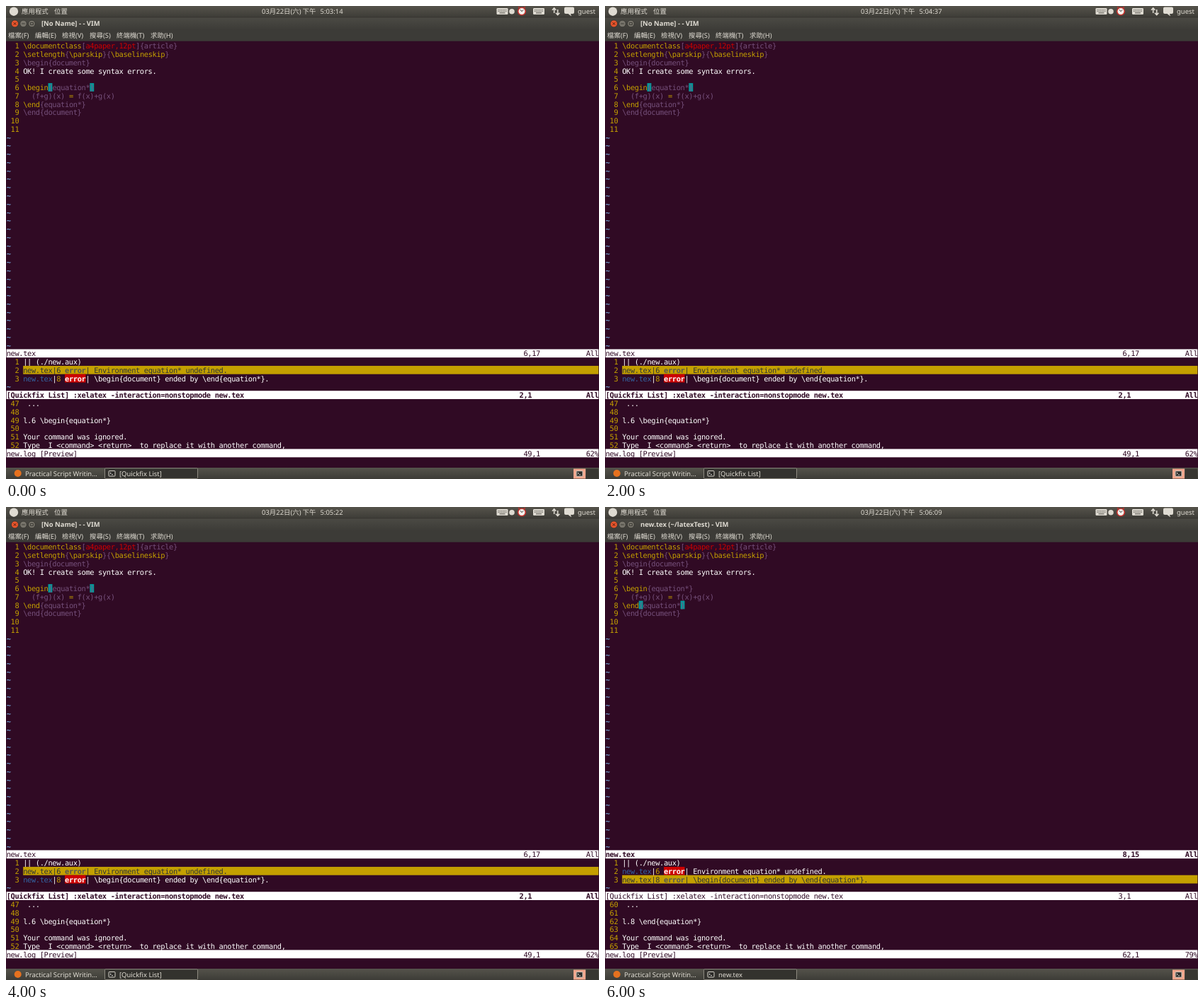
Recreate the animation shown at these times as an HTML page. Size 837 by 669 pixels, loop 7000 ms.

```html
<!DOCTYPE html>
<html lang="zh-Hant">
<head>
<meta charset="utf-8">
<title>Quickfix demo</title>
<style>
html, body { margin: 0; width: 100%; height: 100%; overflow: hidden; background: #300a24; }
svg { display: block; width: 100vw; height: 100vh; }
text { white-space: pre; text-rendering: geometricPrecision; }
.mono { font: 10.4px "DejaVu Sans Mono", monospace; letter-spacing: -.376px; }
.ui { font: 9.45px "Noto Sans", "Noto Sans CJK TC", "Noto Sans CJK", sans-serif; fill: #dfdbd2; }
.b { font-weight: bold; }
</style>
</head>
<body>
<svg viewBox="0 0 837 669">
  <defs>
    <linearGradient id="bar" x2="0" y2="1">
      <stop offset="0" stop-color="#55534b"/><stop offset="1" stop-color="#3d3c37"/>
    </linearGradient>
    <linearGradient id="head" x2="0" y2="1">
      <stop offset="0" stop-color="#4b4a44"/><stop offset="1" stop-color="#3c3b37"/>
    </linearGradient>
    <g id="keys">
      <rect width="16" height="9" rx="1.2" fill="#dfdbd2"/>
      <path d="M2 2.5H14M2 4.5H14" stroke="#4a4842" stroke-width="1" stroke-dasharray="1.2 1"/>
      <path d="M4 6.8H12" stroke="#4a4842" stroke-width="1"/>
    </g>
    <g id="term">
      <rect x=".5" y=".5" width="9" height="7.5" rx=".8" fill="#2b2a27" stroke="#d5d1c8"/>
      <path d="M2.2 2.5L3.8 3.8L2.2 5.1M4.5 5.7H6.5" fill="none" stroke="#fff" stroke-width=".8"/>
    </g>
  </defs>
  <rect width="837" height="669" fill="#300a24"/>

  <rect width="837" height="16" fill="url(#bar)"/>
  <rect y="16" width="837" height="18" fill="url(#head)"/>
  <rect y="33.5" width="837" height="16.2" fill="#3c3b37"/>
  <path d="M0 16H837" stroke="#33322e" stroke-width=".8"/>
  <circle cx="11" cy="7.7" r="6.2" fill="#dfdbd2"/>

  <use href="#keys" x="692.5" y="3"/>
  <circle cx="714" cy="7.7" r="3.8" fill="#dfdbd2"/>
  <circle cx="728" cy="7.5" r="5.3" fill="#f4f1ec" stroke="#c4302b" stroke-width="1.6"/>
  <path d="M723 2.2L724.6 1.2M733 2.2L731.4 1.2" stroke="#c4302b" stroke-width="1.5"/>
  <path d="M726 5.2L728 7.7L730.2 5.4" fill="none" stroke="#333"/>
  <use href="#keys" x="744" y="3"/>
  <path d="M773.7 10V3M771 5.7L773.7 2.8L776.4 5.7M778.7 5V12.5M776 9.8L778.7 12.7L781.4 9.8" fill="none" stroke="#dfdbd2" stroke-width="1.6"/>
  <path d="M790 1.5H800Q802 1.5 802 3.5V9Q802 11 800 11H797L798 14.5L793.5 11H790Q788 11 788 9V3.5Q788 1.5 790 1.5Z" fill="#dfdbd2"/>

  <circle cx="12.5" cy="25" r="5" fill="#e9552c" stroke="#2f2e2a" stroke-width=".7"/>
  <path d="M10.7 23.2L14.3 26.8M14.3 23.2L10.7 26.8" stroke="#4a2014"/>
  <g fill="#77746b" stroke="#2f2e2a" stroke-width=".7">
    <circle cx="24.5" cy="25" r="4.8"/><circle cx="36.4" cy="25" r="4.8"/>
  </g>
  <path d="M22.3 25H26.7M34.4 23.4H38.4V26.6H34.4Z" fill="none" stroke="#35342f" stroke-width=".9"/>

  <rect y="653" width="837" height="16" fill="url(#bar)"/>
  <circle cx="16.7" cy="661" r="5" fill="#e6711f"/>
  <rect x="139.5" y="653.8" width="131" height="14.7" rx="1" fill="#33322e" stroke="#8c897f"/>
  <use href="#term" x="144.5" y="657"/>
  <rect x="801" y="654.5" width="17" height="14" fill="#f0a58c"/>
  <rect x="819" y="654.5" width="17" height="14" fill="#373631"/>
  <use href="#term" x="804.5" y="657.2"/>

  <g id="labels"></g>
  <g id="screen"></g>
</svg>
<script>
const CW = 5.885, RH = 11.76, LEFT = .65, TOP = 50.3, BASE = 10;
const C = {
  y: '#c4a000', p: '#75507b', r: '#cc0000', b: '#3465a4', w: '#ffffff',
  t: '#06989a', n: '#729fcf', bg: '#300a24', k: '#2e3436', g: '#555753'
};
const byId = id => document.getElementById(id);
const esc = s => s.replace(/&/g, '&amp;').replace(/</g, '&lt;');

const put = (row, col, s, color, bold) =>
  `<text class="mono${bold ? ' b' : ''}" x="${LEFT + col * CW}" y="${TOP + row * RH + BASE}" fill="${C[color]}">${esc(s)}</text>`;
const box = (row, col, len, color) =>
  `<rect x="${LEFT + col * CW}" y="${TOP + row * RH}" width="${len * CW}" height="${RH}" fill="${C[color]}"/>`;
const num = (row, n) => put(row, 0, String(n).padStart(3), 'y');
const ui = (x, y, s, bold) =>
  `<text class="ui${bold ? ' b' : ''}" x="${x}" y="${y}">${s}</text>`;

// Consecutive coloured runs: [colour, text], ...
function runs(row, col, parts) {
  let out = '';
  for (const [color, s] of parts) {
    out += put(row, col, s, color);
    col += s.length;
  }
  return out;
}

function status(row, name, col, pos, share, bold) {
  return box(row, 0, 142, 'w') + put(row, 0, name, 'bg', bold) +
    put(row, col, pos, 'bg', bold) + put(row, 139, share, 'bg', bold);
}

const SOURCE = [
  [['y', '\\documentclass'], ['p', '['], ['r', 'a4paper,12pt'], ['p', ']{article}']],
  [['y', '\\setlength'], ['p', '{'], ['y', '\\parskip'], ['p', '}{'], ['y', '\\baselineskip'], ['p', '}']],
  [['p', '\\begin{document}']],
  [['w', 'OK! I create some syntax errors.']],
  [],
  [['y', '\\begin'], ['p', '{equation*}']],
  [['p', '  (f+g)(x) '], ['y', '='], ['p', ' f(x)+g(x)']],
  [['y', '\\end'], ['p', '{equation*}']],
  [['p', '\\end{document}']],
  [], []
];

// The two compile errors: matching braces, log position and message
const ERRORS = [
  { line: 6, open: 6, pos: '6,17', log: 47, share: '62%', code: 'l.6 \\begin{equation*}',
    msg: ' Environment equation* undefined.' },
  { line: 8, open: 4, pos: '8,15', log: 60, share: '79%', code: 'l.8 \\end{equation*}',
    msg: ' \\begin{document} ended by \\end{equation*}.' }
];

// clock, focus on the editor window, error chosen in the list, error jumped to
const STEPS = [
  ['5:03:14', false, 0, 0],
  ['5:03:35', false, 1, 0],
  ['5:04:37', false, 0, 0],
  ['5:04:55', true, 0, 0],
  ['5:05:22', false, 0, 0],
  ['5:05:49', false, 1, 0],
  ['5:06:09', true, 1, 1]
];

function editor(focus, at) {
  const e = ERRORS[at], row = e.line - 1;
  let out = box(row, 4 + e.open, 1, 't') + box(row, 14 + e.open, 1, 't');
  SOURCE.forEach((parts, i) => out += num(i, i + 1) + runs(i, 4, parts));
  for (let r = SOURCE.length; r < 37; r++) out += put(r, 0, '~', 'n', true);
  return out + status(37, 'new.tex', 124, e.pos, 'All', focus);
}

function errorList(focus, pick, at) {
  let out = num(38, 1) + put(38, 4, '|| (./new.aux)', 'w');
  ERRORS.forEach((e, i) => {
    const row = 39 + i, on = i === at;
    const [file, bar, line, word] = on ? 'kkkg' : 'bwyw';
    out += on ? box(row, 4, 138, 'y') : box(row, 14, 5, 'r');
    out += num(row, i + 2) + put(row, 14, 'error', word, true) +
      runs(row, 4, [[file, 'new.tex'], [bar, '|'], [line, e.line + ' ']]) +
      put(row, 19, '|' + e.msg, bar);
  });
  return out + put(41, 0, '~', 'n', true) +
    status(42, '[Quickfix List] :xelatex -interaction=nonstopmode new.tex',
      123, `${pick + 2},1`, 'All', !focus);
}

function preview(pick) {
  const e = ERRORS[pick];
  const lines = [' ...', '', e.code, '', 'Your command was ignored.',
    'Type  I <command> <return>  to replace it with another command,'];
  return lines.map((s, i) => num(43 + i, e.log + i) + put(43 + i, 4, s, 'w')).join('') +
    status(49, 'new.log [Preview]', 124, `${e.log + 2},1`, e.share, false);
}

function labels(clock, focus) {
  const menu = [[3, '檔案(F)'], [41, '編輯(E)'], [79, '檢視(V)'],
    [118, '搜尋(S)'], [156, '終端機(T)'], [204, '求助(H)']];
  return ui(22, 11.2, '應用程式') + ui(68, 11.2, '位置') +
    ui(361, 11.2, '03月22日(六)') + ui(418.5, 11.2, '下午') + ui(443.5, 11.2, clock) +
    ui(807, 11.2, 'guest') +
    ui(50, 28, focus ? 'new.tex (~/latexTest) - VIM' : '[No Name] - - VIM', true) +
    menu.map(([x, s]) => ui(x, 45, s)).join('') +
    ui(27, 664.5, 'Practical Script Writin…') +
    ui(160, 664.5, focus ? 'new.tex' : '[Quickfix List]');
}

let shown = -1;
function draw(ms) {
  const i = Math.floor(ms / 1000) % STEPS.length;
  if (i === shown) return;
  shown = i;
  const [clock, focus, pick, at] = STEPS[i];
  byId('labels').innerHTML = labels(clock, focus);
  byId('screen').innerHTML = editor(focus, at) + errorList(focus, pick, at) + preview(pick);
}

const start = performance.now();
function tick() {
  draw(performance.now() - start);
  requestAnimationFrame(tick);
}
tick();
</script>
</body>
</html>
```
